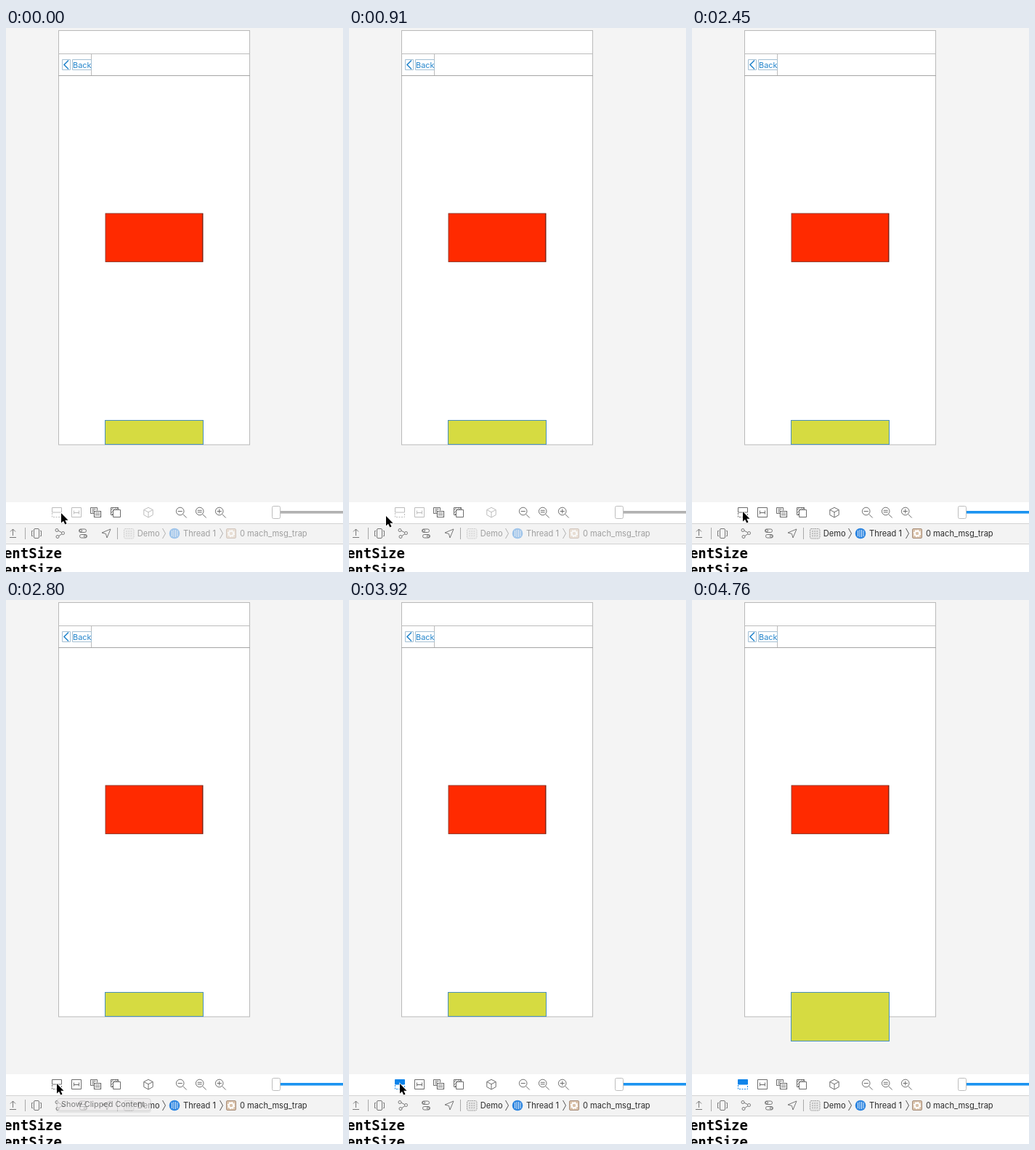
Recreate the animation shown at these times as an HTML page. Size 464 px wide and 748 px high, loop 4.83 s.

```html
<!DOCTYPE html>
<html lang="en">
<head>
<meta charset="utf-8">
<title>View debugger</title>
<style>
html, body { margin: 0; width: 100%; height: 100%; overflow: hidden; background: #f4f4f4; }
svg { display: block; width: 464px; height: 748px; font: 11.1px Inter, "Liberation Sans", sans-serif; }
.icon { fill: none; stroke: #6c6c6c; stroke-width: 1; }
.line { fill: none; stroke: #bcbcbc; }
.blue { fill: none; stroke: #2586cc; }
.idle .dim { opacity: .45; }
.idle .path { opacity: .42; }
#track { fill: #1b93f0; }
.idle #track { fill: #b1b1b1; }
#clip.on { stroke: #0f84ea; }
#clip.on .half { fill: #0f84ea; }
</style>
</head>
<body>
<svg id="stage" class="idle" viewBox="0 0 464 748">
  <rect width="464" height="748" fill="#f4f4f4"/>

  <!-- device -->
  <rect x="72.5" y="3.5" width="263" height="569.5" fill="#fff" stroke="#b9b9b9"/>
  <path class="line" d="M72 35.5H336M117.5 36V65"/>
  <path class="line" d="M72 65.5H336" style="stroke:#a5a5a5"/>
  <path class="blue" d="M77.5 43.5h11v14h-11zM91.5 43.5h26v14h-26z" style="stroke:#a3bfd3"/>
  <path class="blue" d="M86 44.5L80 50.5 86 56.5" stroke-width="1.6"/>
  <text x="92" y="54.6" fill="#2586cc" font-size="10.9">Back</text>
  <rect x="137" y="255" width="134" height="66.5" fill="#ff2a00" stroke="#8b3a2c" stroke-width=".9"/>
  <path d="M270.7 255V321.5" stroke="#7b2012"/>
  <rect id="yellow" x="136.5" y="539.5" width="135" height="33" fill="#d6db41" stroke="#4990bd"/>

  <!-- view toolbar -->
  <rect y="652" width="464" height="30" fill="#fff"/>
  <g class="icon">
    <g class="dim">
      <g id="clip">
        <path class="half" d="M63.5 659.5h13v6.5h-13z"/>
        <path d="M63.5 667v5.5h13V667" stroke-dasharray="2 1.5"/>
      </g>
      <path d="M90.5 659.5h13v13h-13zM93.5 663.5v5M100.5 663.5v5M93.5 666.5h7"/>
      <path d="M196 659.3l6.2 3.2v7l-6.2 3.5-6.2-3.5v-7zM189.8 662.5l6.2 3.2 6.2-3.2M196 665.7v7.3"/>
    </g>
    <path d="M121 667.5h-4.5v-8h9v4M118.5 661.5h5M118.5 663.5h3M118.5 665.5h2"/>
    <path d="M121.5 664.5h9v8h-9zM123 667h6M123 669.5h6" stroke-width="1.2"/>
    <path d="M147.5 662.5h10v10h-10zM147 669.5h-2.5v-10h10v2.5M144.5 663l3.5-3.5M144.5 667l7.5-7.5M145 670l2.5-2.5M152 662l2.5-2.5"/>
    <g id="zooms"></g>
  </g>
  <rect id="track" x="377" y="664" width="87" height="3.6"/>
  <rect x="366.5" y="657.5" width="11" height="17" rx="2" fill="#fff" stroke="#bdbdbd"/>

  <!-- path bar -->
  <rect y="681" width="464" height="29" fill="#f3f3f3"/>
  <path class="line" d="M0 681.5H464M0 709.5H464" style="stroke:#d2d2d2"/>
  <g class="icon" style="stroke:#777">
    <path d="M5 700.5h9M9.5 698v-9M6 692.5l3.5-3.5 3.5 3.5"/>
    <rect x="38.5" y="688.5" width="7" height="13" rx="1.5"/>
    <path d="M37 691.5h-1.5v7H37M47 691.5h1.5v7H47"/>
    <circle cx="70" cy="690.5" r="2"/><circle cx="78.5" cy="694.5" r="2"/><circle cx="71" cy="699.5" r="2"/>
    <path d="M72 691.3l4.6 2.3M72.7 698.5l4.2-2.8"/>
    <rect x="100.500" y="689" width="10" height="4.500" rx="2.200"/><circle cx="103" cy="691.2" r="1.6"/>
    <rect x="101.500" y="696.500" width="10" height="4.500" rx="2.200"/><circle cx="109" cy="698.7" r="1.6"/>
    <path d="M144 689l-5 12-1.500-5.500-5.500-1.500z"/>
  </g>
  <path d="M26.500 687v16M153.500 687v16" stroke="#a9a9a9"/>
  <g class="path">
    <rect x="162.500" y="688.500" width="13.500" height="13.500" rx="2" fill="#e9e9e9" stroke="#8d8d8d" stroke-dasharray="1.500 1"/>
    <path d="M165 692h9M165 695.300h9M165 698.600h9M166 691v9M169.300 691v9M172.600 691v9" stroke="#a8a8a8" stroke-width=".7" stroke-dasharray="2 1"/>
    <circle cx="232" cy="695" r="7.300" fill="#2f86e0"/>
    <path d="M228.500 691v8M231 690v10M233.500 690v10M236 691v8" stroke="#d5e7fa"/>
    <rect x="303.500" y="688.500" width="13" height="13" rx="1.500" fill="#d9c2aa" stroke="#a98f7c"/>
    <circle cx="310" cy="695" r="3.300" fill="none" stroke="#fff" stroke-width="2"/>
    <circle cx="310" cy="695" r="4.600" fill="none" stroke="#fff" stroke-width="1.300" stroke-dasharray="1.800"/>
    <path d="M215.500 688l4 7-4 7M294.500 688l4 7-4 7" fill="none" stroke="#555"/>
    <g fill="#2b2b2b">
      <text x="180.700" y="699">Demo</text>
      <text x="244" y="699">Thread 1</text>
      <text x="322" y="699">0 mach_msg_trap</text>
    </g>
  </g>

  <!-- console -->
  <rect y="710" width="464" height="38" fill="#fff"/>
  <g font-family="'DejaVu Sans Mono', monospace" font-weight="bold" font-size="19" text-anchor="end">
    <text x="77" y="728.500">contentSize</text>
    <text x="77" y="751.500">contentSize</text>
  </g>

  <g id="tip">
    <rect x="69" y="686" width="131" height="19" rx="4" fill="#000" opacity=".1"/>
    <rect x="70.500" y="685.500" width="128.500" height="16.500" rx="3" fill="#ebe9ea" stroke="#c6c4c5"/>
    <text x="76" y="697.300" font-size="10.900" fill="#303030">Show Clipped Content</text>
  </g>
  <path id="cursor" d="M0 0V13.500L3 10.700 5.300 15.500 7.500 14.500 5.300 9.800H9.500Z" stroke="#fff" stroke-width="1.400" paint-order="stroke"/>
</svg>
<script>
const LOOP = 4830, STEP = 70;
const $ = id => document.getElementById(id);

// magnifiers: out, fit, in
$("zooms").innerHTML = ["M-3 0h6", "M-3 -1.2h6M-3 1.3h6", "M-3 0h6M0 -3v6"].map((mark, i) =>
  `<g transform="translate(${239.7 + 27 * i} 664.500)"><circle r="5.300"/><path d="M4 4l5 5${mark}"/></g>`).join("");

// time, x, y of the pointer tip
const route = [
  [0, 76, 667], [140, 70, 672], [210, 70, 672], [490, 46, 678], [560, 46, 678],
  [630, 36, 668], [700, 40, 656], [770, 51, 668], [840, 51, 668], [910, 51, 671],
  [1190, 74, 673], [1470, 74, 673], [1540, 74, 670], [1610, 74, 672], [1750, 74, 672],
  [2100, 70, 665], [3920, 70, 665], [3990, 70, 667], [4060, 70, 667],
  [4400, 104, 728], [4620, 139, 683], [4690, 164, 607]
];
const ramp = (t, a, b) => Math.min(1, Math.max(0, (t - a) / (b - a)));

function pointer(t) {
  const i = route.findIndex(p => p[0] > t);
  if (i < 0) return route[route.length - 1].slice(1);
  const [a, b] = [route[i - 1], route[i]], k = ramp(t, a[0], b[0]);
  return [1, 2].map(n => a[n] + (b[n] - a[n]) * k);
}

function draw(now) {
  const t = Math.floor(now % LOOP / STEP) * STEP;
  $("stage").classList.toggle("idle", t < 1050);
  $("clip").classList.toggle("on", t >= 3850);
  $("yellow").setAttribute("height", t < 4130 ? 33 : 67);
  $("tip").setAttribute("opacity", ramp(t, 2590, 2940) * (1 - ramp(t, 3570, 3780)));
  $("cursor").setAttribute("transform", `translate(${pointer(t)})`);
  $("cursor").setAttribute("visibility", t < 4760 ? "visible" : "hidden");
}

const start = performance.now();
function tick() {
  draw(performance.now() - start);
  requestAnimationFrame(tick);
}
tick();
</script>
</body>
</html>
```
